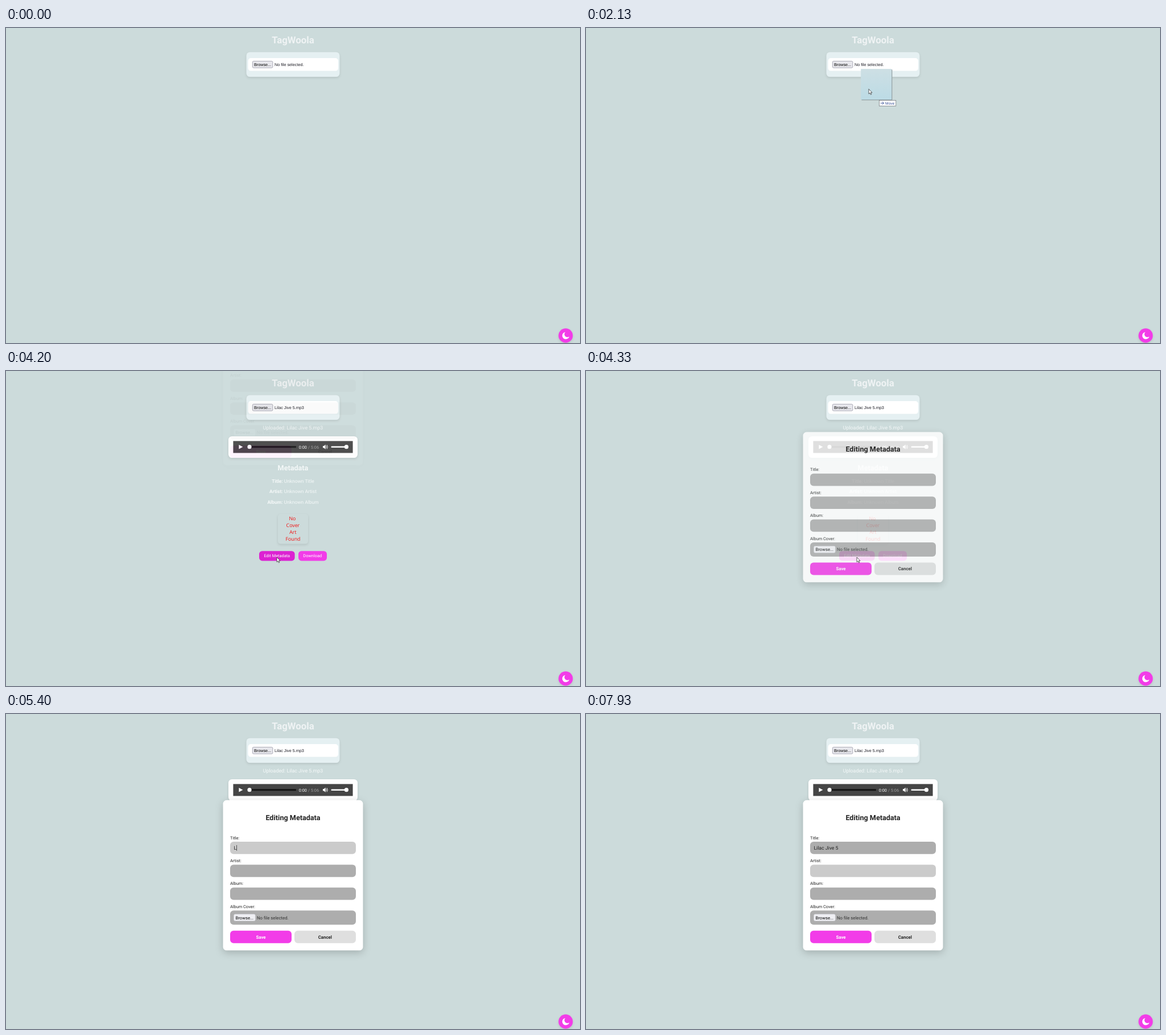
Write an HTML page that moves like this. It is 1009 px wide and 555 px high and loops after 8 s.

```html
<!DOCTYPE html>
<html lang="en">
<head>
<meta charset="utf-8">
<title>TagWoola</title>
<style>
  html, body { margin: 0; width: 100%; height: 100%; overflow: hidden; background: #ccdbdb; }
  svg { display: block; width: 1009px; height: 555px; }
  text { font: 8.41px Roboto, sans-serif; fill: #f5f9f9; white-space: pre; text-rendering: geometricPrecision; }
  .mid { text-anchor: middle; }
  .bold { font-weight: 700; }
  .h1 { font-size: 16.82px; fill: #eff3f4; }
  .h2 { font-size: 12.61px; }
  .small { font-size: 7.36px; }
  .btn { font-size: 7.88px; font-weight: 700; }
  .file { font: 7.25px "Liberation Sans", Arial, sans-serif; fill: #1c1c24; }
  .dark { fill: #222; }
  .art { font: 8.8px "Open Sans", sans-serif; fill: #f21010; }
  .pink { fill: #f23ce8; }
  .white { fill: #fff; }
  .field { fill: #adadad; }
  .soft { filter: drop-shadow(0 2px 2px rgba(0, 0, 0, .1)); }
  .deep { filter: drop-shadow(0 4px 7px rgba(0, 0, 0, .2)); }
  .cursor { fill: #fff; stroke: #111; stroke-width: .65; stroke-linejoin: round; }
</style>
</head>
<body>
<svg viewBox="0 0 1009 555">
  <defs>
    <linearGradient id="sky" x2="0" y2="1">
      <stop stop-color="#cddfe4"/><stop offset="1" stop-color="#bcdbe5"/>
    </linearGradient>
  </defs>

  <text class="h1 bold mid" x="504.5" y="27">TagWoola</text>

  <rect class="soft" x="422.5" y="42.5" width="164" height="43.5" rx="6.3" fill="#e5f0f2"/>
  <rect class="white" x="425.5" y="53" width="158.5" height="22.6" rx="5"/>
  <rect x="433.3" y="58.4" width="35.6" height="11.8" rx="2" fill="#e7e7ec" stroke="#8f8f9d" stroke-width=".7"/>
  <text class="file mid" x="451" y="67.1" style="fill:#000">Browse...</text>
  <text class="file" id="fileName" x="471.9" y="67.1"></text>

  <g id="result">
    <text class="mid" x="504.5" y="102.5" style="font-size:8.85px">Uploaded: Lilac Jive 5.mp3</text>

    <rect class="white soft" x="391" y="115" width="227" height="38" rx="6.3"/>
    <rect x="399.4" y="123.4" width="210.2" height="21" fill="#454545"/>
    <path class="white" d="M409.4 130l7 3.8-7 3.8z"/>
    <rect x="428" y="132.2" width="82" height="3" rx="1" fill="#141414"/>
    <circle class="white" cx="428" cy="133.7" r="3.6"/>
    <text class="small white" x="514.8" y="136.5">0:00</text>
    <text class="small" x="531" y="136.5" style="fill:#a2a2a2">/ 5:06</text>
    <path class="white" d="M557 132h2l2.6-2.4v8.4L559 135.6h-2z"/>
    <path d="M562.8 131.8q1.4 2 0 4M564 130.2q2.8 3.6 0 7.2" fill="none" stroke="#fff" stroke-width=".9"/>
    <rect class="white" x="571.5" y="132.4" width="28" height="2.6" rx="1"/>
    <circle class="white" cx="598.4" cy="133.7" r="3.6"/>

    <text class="h2 bold mid" x="504.5" y="175.3">Metadata</text>
    <text class="mid" x="504.5" y="197"><tspan class="bold">Title:</tspan><tspan class="value"> Unknown Title</tspan></text>
    <text class="mid" x="504.5" y="215.3"><tspan class="bold">Artist:</tspan><tspan class="value"> Unknown Artist</tspan></text>
    <text class="mid" x="504.5" y="233.7"><tspan class="bold">Album:</tspan><tspan class="value"> Unknown Album</tspan></text>

    <rect class="soft" x="478" y="252" width="53" height="52.6" rx="5" fill="#ccdbdb"/>
    <text class="art mid" x="503.4" y="263.4">No</text>
    <text class="art mid" x="504.4" y="275.4">Cover</text>
    <text class="art mid" x="504.4" y="287.4">Art</text>
    <text class="art mid" x="504.4" y="299.3">Found</text>

    <rect class="pink" id="edit" x="445" y="317.2" width="62.6" height="17.2" rx="5.3"/>
    <text class="small mid white" x="476.3" y="328.4">Edit Metadata</text>
    <rect class="pink" x="514" y="317.2" width="50" height="17.2" rx="5.3"/>
    <text class="small mid white" x="538.7" y="328.4">Download</text>
  </g>

  <circle class="pink soft" cx="983.8" cy="541.9" r="12.6"/>
  <path class="white" d="M990.2 543.4A6.3 6.3 0 1 1 983.3 535.7A4.9 4.9 0 0 0 990.2 543.4Z"/>

  <g id="modal">
    <rect class="white deep" x="381.5" y="151.8" width="246" height="264.7" rx="6.3"/>
    <text class="h2 bold mid dark" x="504.5" y="186.5">Editing Metadata</text>
    <text class="small dark" x="394" y="220.6">Title:</text>
    <rect class="field" id="title" x="394" y="225" width="221" height="21.8" rx="6"/>
    <text class="small dark" x="394" y="261">Artist:</text>
    <rect class="field" id="artist" x="394" y="265.4" width="221" height="21.8" rx="6"/>
    <text class="small dark" x="394" y="301.4">Album:</text>
    <rect class="field" x="394" y="305.8" width="221" height="21.8" rx="6"/>
    <text class="small dark" x="394" y="341.8">Album Cover:</text>
    <rect class="field" x="394" y="346.2" width="221" height="25" rx="6"/>
    <rect x="400.6" y="352.8" width="37.6" height="11.8" rx="2" fill="#efeff3" stroke="#d5d5dc" stroke-width=".5"/>
    <text class="mid" x="419.3" y="361.7" style="font-size:7.65px;fill:#000">Browse...</text>
    <text x="441" y="361.7" style="font-size:7.8px;fill:#333">No file selected.</text>
    <rect class="pink" x="394" y="381.8" width="108" height="22" rx="6"/>
    <text class="btn mid white" x="448" y="395.6">Save</text>
    <rect x="507" y="381.8" width="108" height="22" rx="6" fill="#dfdfdf"/>
    <text class="btn mid dark" x="560.8" y="395.6">Cancel</text>
    <text class="dark" id="typed" x="400.4" y="238.8" style="font-size:8.7px"></text>
    <rect id="caret" width=".7" height="10" fill="#222"/>
  </g>

  <g id="drag">
    <rect x="1.2" y="1.2" width="54" height="54" fill="#929fa2"/>
    <rect width="54" height="54" fill="url(#sky)"/>
    <rect x="32.4" y="55.3" width="29.2" height="10" fill="#fff" stroke="#6d7377" stroke-width=".7"/>
    <path d="M34.6 60.3h5.6M37.6 57.7l2.7 2.6-2.7 2.6" fill="none" stroke="#26418f" stroke-width=".8"/>
    <text x="42.8" y="62.6" style="font:6.3px 'Open Sans',sans-serif;fill:#1f3a8a">Move</text>
  </g>

  <path class="cursor" id="arrow" d="M0 0V8.6L2 6.8 3.4 9.8 4.8 9.2 3.4 6.3H6Z"/>
  <path class="cursor" id="hand" d="M-1.2 .6Q-.3-.8.6.6V4.4L4.2 5.3Q5.3 5.7 5.2 7L4.5 11.2H-.6L-3.7 7.5Q-3.6 5.9-2.2 6.7L-1.2 7.7Z"/>
  <path id="beam" d="M-2-4.7H2M0-4.7V4.7M-2 4.7H2" fill="none" stroke="#111" stroke-width=".7"/>
</svg>

<script>
const LOOP = 8000, FPS = 15;
const OPEN_AT = 4180, OPEN_TIME = 288, MODAL_HEIGHT = 264.7;
const TITLE = 'Lilac Jive 5';
const KEY_TIMES = [5400, 5600, 5670, 5800, 5930, 6000, 6200, 6330, 6470, 6600, 6730, 7070];

// time, x, y of the pointer tip
const POINTER = [
  [1467, 947, 255], [1533, 894, 255], [1667, 782, 235], [1867, 622, 180], [2067, 510, 120],
  [2200, 484, 95], [2267, 501, 80], [2467, 510, 66], [3000, 510, 66], [3200, 503, 110],
  [3530, 486, 230], [3867, 476, 312], [3933, 476, 328], [4400, 476, 328], [4733, 465, 264],
  [4800, 463, 257], [4867, 461, 247], [5000, 461, 245]
];

const $ = id => document.getElementById(id);
const values = document.querySelectorAll('.value');
const clamp = v => Math.min(1, Math.max(0, v));
const show = (el, on) => { el.style.display = on ? '' : 'none'; };
const place = (el, [x, y]) => el.setAttribute('transform', `translate(${x} ${y})`);

function pointerAt(t) {
  const i = POINTER.findIndex(k => k[0] > t);
  if (i < 1) return (i < 0 ? POINTER.at(-1) : POINTER[0]).slice(1);
  const [t0, x0, y0] = POINTER[i - 1], [t1, x1, y1] = POINTER[i];
  const p = (t - t0) / (t1 - t0);
  return [x0 + (x1 - x0) * p, y0 + (y1 - y0) * p];
}

// CSS "ease": cubic-bezier(.25, .1, .25, 1)
function ease(x) {
  const curve = (s, a, b) => 3 * s * (1 - s) ** 2 * a + 3 * s * s * (1 - s) * b + s ** 3;
  let lo = 0, hi = 1;
  for (let i = 0; i < 24; i++) {
    const s = (lo + hi) / 2;
    if (curve(s, .25, .25) < x) lo = s; else hi = s;
  }
  return curve(lo, .1, 1);
}

function tint(el, focus) {
  const g = Math.round(173 + 30 * focus);
  el.style.fill = `rgb(${g},${g},${g})`;
}

function draw(t) {
  const uploaded = t >= 2795;
  $('fileName').textContent = uploaded ? TITLE + '.mp3' : 'No file selected.';
  show($('result'), uploaded);
  values.forEach(v => show(v, t >= 2860));
  $('edit').style.fill = t >= 3925 && t < 4600 ? '#dc22d2' : '';

  const p = ease(clamp((t - OPEN_AT) / OPEN_TIME));
  show($('modal'), t > OPEN_AT);
  place($('modal'), [0, -MODAL_HEIGHT * (1 - p)]);
  $('modal').setAttribute('opacity', p);

  const focusTitle = clamp((t - 4800) / 200), focusArtist = clamp((t - 7335) / 130);
  tint($('title'), focusTitle - focusArtist);
  tint($('artist'), focusArtist);

  const count = KEY_TIMES.filter(k => t >= k - 5).length;
  $('typed').textContent = TITLE.slice(0, count);
  const inArtist = t >= 7395;
  show($('caret'), t >= 4925 && t < 7925);
  const width = count && !inArtist ? $('typed').getComputedTextLength() : 0;
  place($('caret'), [400.3 + width, inArtist ? 271 : 231]);

  const dragging = t >= 1525 && !uploaded;
  const [dx, dy] = pointerAt(t - 1000 / FPS);
  show($('drag'), dragging);
  place($('drag'), [dx - 27, dy - 48]);

  const pos = pointerAt(t);
  const kind = t < 1525 || t >= 5395 ? '' : t >= 4860 ? 'beam' : uploaded && pos[1] < 76 ? 'hand' : 'arrow';
  for (const id of ['arrow', 'hand', 'beam']) {
    show($(id), id === kind);
    place($(id), pos);
  }
}

function tick() {
  const t = performance.now() % LOOP;
  draw(Math.floor((t + 5) * FPS / 1000) * 1000 / FPS % LOOP);
  requestAnimationFrame(tick);
}
tick();
</script>
</body>
</html>
```
